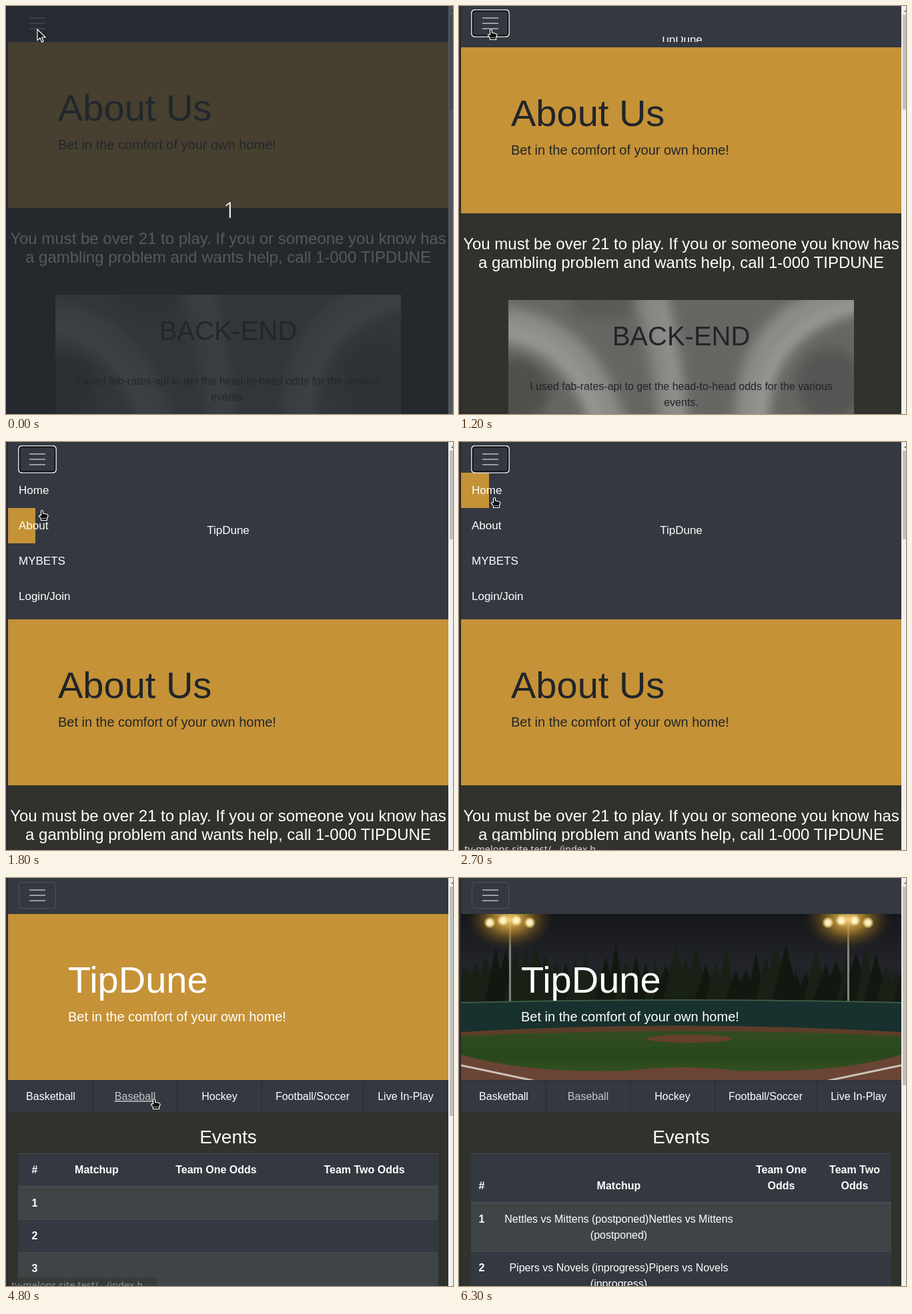
These frames come from a looping animation (670x612 px, 6.8 s). An HTML page:

```html
<!DOCTYPE html>
<html lang="en">
<head>
<meta charset="utf-8">
<title>TipDune</title>
<style>
html, body { margin: 0; width: 100%; height: 100%; overflow: hidden; background: #31312d; }
svg { display: block; width: 100vw; height: 100vh; }
text { font-family: "Liberation Sans", Arial, sans-serif; white-space: pre; }
.ui { font-family: "Noto Sans", "Open Sans", sans-serif; }
</style>
</head>
<body>
<svg id="stage" viewBox="0 0 670 612"></svg>
<script>
const LOOP = 6800, STEP = 100;
const NAV = '#343840', BODY = '#31312d', GOLD = '#c59237', INK = '#212529', LINE = '#454d55';
const BRAND = 'TipDune', SLOGAN = 'Bet in the comfort of your own home!';
const MENU_H = 212;

const rect = (x, y, w, h, fill, more = '') =>
  `<rect x="${x}" y="${y}" width="${w}" height="${h}" fill="${fill}" ${more}/>`;
const text = (x, y, size, fill, str, more = '') =>
  `<text x="${x}" y="${y}" font-size="${size}" fill="${fill}" ${more}>${str}</text>`;
const mid = (x, y, size, fill, str, more = '') =>
  text(x, y, size, fill, str, `text-anchor="middle" ${more}`);
const bold = (x, y, str) => mid(x, y, 16, '#fff', str, 'font-weight="700"');
const group = (id, inner, more = '') => `<g id="${id}" ${more}>${inner}</g>`;

// Soft grey swirls behind the card
function card() {
  const streak = (d, w, c) => `<path d="${d}" fill="none" stroke="${c}" stroke-width="${w}"/>`;
  const swirl =
    streak('M60 470Q190 480 228 640', 54, '#8b8b87') +
    streak('M60 480Q185 495 210 640', 14, '#9a9a96') +
    streak('M285 420Q310 500 325 640', 46, '#868682') +
    streak('M305 420Q322 520 330 640', 12, '#959591') +
    streak('M620 425Q425 445 440 640', 50, '#8b8b87') +
    streak('M620 440Q445 470 455 640', 16, '#9c9c98') +
    `<ellipse cx="85" cy="570" rx="50" ry="50" fill="#4f4f4c"/>
     <ellipse cx="555" cy="560" rx="48" ry="55" fill="#555552"/>
     <ellipse cx="215" cy="440" rx="50" ry="22" fill="#5a5a57"/>`;
  return `<g clip-path="url(#cardClip)">${rect(74, 433, 518, 200, '#666663')}
    <g filter="url(#soft)">${swirl}</g></g>` +
    mid(333, 501, 40, INK, 'BACK-END') +
    mid(333, 568, 16, INK, 'I used fab-rates-api to get the head-to-head odds for the various') +
    mid(333, 592, 16, INK, 'events.');
}

function aboutPage() {
  const links = ['Home', 'About', 'MYBETS', 'Login/Join']
    .map((s, i) => text(19, 78 + 53 * i, 17, '#fff', s)).join('');
  const body = rect(3, 54, 660, 249, GOLD) +
    text(78, 172, 56, INK, 'About Us') + text(78, 215, 20, INK, SLOGAN) +
    mid(333, 357, 24, '#fff', 'You must be over 21 to play. If you or someone you know has') +
    mid(333, 385, 24, '#fff', 'a gambling problem and wants help, call 1-000 TIPDUNE') +
    rect(80, 415, 508, 1, '#000', 'opacity=".12"') + card();
  return rect(3, 0, 660, 300, NAV) + group('aboutBody', rect(3, 54, 660, 700, BODY) + body) +
    `<g clip-path="url(#menuClip)">${rect(0, 46, 0, 53, GOLD, 'id="hover"')}${links}
     ${mid(333, 0, 17, '#fff', BRAND, 'id="brand"')}</g>`;
}

// Floodlit ball field in plain shapes
function field() {
  let seed = 7, trees = '';
  const rnd = () => (seed = seed * 16807 % 2147483647) / 2147483647;
  for (let x = -5; x < 680; x += 15) {
    const h = 48 + rnd() * 48, w = 15 + rnd() * 9;
    trees += `<path d="M${x - w} 192L${x} ${190 - h}L${x + w} 192Z" fill="${rnd() < .5 ? '#12180f' : '#192015'}"/>`;
  }
  const lamp = x => rect(x - 1, 62, 3, 124, '#85857d') +
    `<ellipse cx="${x}" cy="62" rx="66" ry="46" fill="url(#glow)"/>` +
    [-30, -10, 10, 30].map(d => `<circle cx="${x + d}" cy="${62 + Math.abs(d) / 6}" r="9" fill="url(#bulb)"/>`).join('');
  const chalk = d => `<path d="${d}" stroke="#c9c2b8" stroke-width="3"/>`;
  return `<g clip-path="url(#heroClip)">${rect(3, 54, 660, 249, 'url(#sky)')}${trees}${lamp(76)}${lamp(583)}
    <path d="M3 187Q333 179 663 187V230H3Z" fill="#18302e"/>
    <path d="M3 187Q333 179 663 187" fill="none" stroke="#3b5a45" stroke-width="2"/>
    <path d="M3 231Q333 212 663 231V303H3Z" fill="#5c3d29"/>
    <path d="M3 237Q333 222 663 237V303H3Z" fill="url(#grass)"/>
    <ellipse cx="345" cy="241" rx="64" ry="6" fill="#674129"/>
    <path d="M3 265Q70 284 150 288Q240 292 270 287Q335 281 400 287Q430 292 515 288Q600 284 663 265V303H3Z" fill="#6a4434"/>
    ${chalk('M3 281L112 304')}${chalk('M663 281L553 304')}</g>`;
}

function table(id, heads, headH, rowH, rows) {
  let y = 413 + headH, out = rect(18, 413, 630, headH, NAV) + rect(18, 413, 630, 1, LINE) + heads;
  rows.forEach((row, i) => {
    out += rect(18, y, 630, rowH, i % 2 ? NAV : '#3f4447') + rect(18, y - (i ? 0 : 1), 630, i ? 1 : 2, LINE) + row(y + 30);
    y += rowH;
  });
  return group(id, out);
}

function homePage() {
  const tabs = [['Basketball', 67], ['Baseball', 193.5], ['Hockey', 320], ['Football/Soccer', 459.5], ['Live In-Play', 599]]
    .map(([s, x]) => mid(x, 333, 16, '#fff', s, `id="tab${s.slice(0, 4)}"`)).join('');
  const empty = table('empty',
    bold(43, 443, '#') + bold(136, 443, 'Matchup') + bold(315, 443, 'Team One Odds') + bold(537, 443, 'Team Two Odds'),
    50, 49, [1, 2, 3, 4].map(n => y => bold(43, y, n)));
  const game = (n, a, b, state) => y => bold(34, y, n) +
    mid(239.5, y, 16, '#fff', `${a} vs ${b} (${state})${a} vs ${b}`) + mid(239.5, y + 24, 16, '#fff', `(${state})`);
  const games = table('games',
    bold(34, 467, '#') + bold(239.5, 467, 'Matchup') + bold(483, 443, 'Team One') + bold(483, 467, 'Odds') +
    bold(593, 443, 'Team Two') + bold(593, 467, 'Odds'),
    74, 73, [game(1, 'Nettles', 'Mittens', 'postponed'), game(2, 'Pipers', 'Novels', 'inprogress')]);
  return rect(3, 0, 660, 612, BODY) + rect(3, 0, 660, 54, NAV) + rect(3, 54, 660, 249, GOLD) +
    group('field', field()) +
    text(93, 172, 56, '#fff', BRAND) + text(93, 215, 20, '#fff', SLOGAN) +
    rect(3, 303, 660, 49, NAV) + rect(3, 303, 660, 1, '#2b2e33') +
    [130, 256, 383, 535].map(x => rect(x, 303, 1, 49, '#2a2d31')).join('') + tabs +
    mid(333, 398, 28, '#fff', 'Events') + empty + games;
}

const box = (i, c, w) => rect(19.5 + i, 6.5 + i, 55 - 2 * i, 39 - 2 * i, 'none', `rx="4" stroke="${c}" stroke-width="${w}"`);
const toggler = box(0, 'rgba(255,255,255,.13)', 1) +
  group('ring', box(-.5, '#fff', 1.5) + box(1, '#0b0c0e', 1.8)) +
  [18, 26, 34].map(y => rect(35, y - 1, 24, 2, '#fff', 'opacity=".5"')).join('');

const stop = (at, c, o = 1) => `<stop offset="${at}" stop-color="${c}" stop-opacity="${o}"/>`;
const clip = (id, x, y, w, h) => `<clipPath id="${id}">${rect(x, y, w, h, '#000', `id="${id}Box"`)}</clipPath>`;
const defs = `<defs>
  ${clip('menuClip', 3, 46, 660, 0)}${clip('cardClip', 74, 433, 518, 200)}${clip('heroClip', 3, 54, 660, 249)}
  <filter id="soft" filterUnits="userSpaceOnUse" x="40" y="400" width="600" height="260"><feGaussianBlur stdDeviation="9"/></filter>
  <linearGradient id="sky" x2="0" y2="1">${stop(0, '#15171a')}${stop(.3, '#22242a')}${stop(.6, '#171b16')}</linearGradient>
  <linearGradient id="grass" x2="0" y2="1">${stop(0, '#324c22')}${stop(.5, '#29471b')}${stop(1, '#375424')}</linearGradient>
  <radialGradient id="glow">${stop(0, '#f4d27a')}${stop(.4, '#b98a2e', .75)}${stop(1, '#4a3510', 0)}</radialGradient>
  <radialGradient id="bulb">${stop(0, '#fffbe6')}${stop(.5, '#fff0b0', .9)}${stop(1, '#f4cf6a', 0)}</radialGradient>
</defs>`;

const arrow = `<path id="arrow" d="M0 0V16.500L4 13L6.700 19L9.300 18L6.700 12H12Z" fill="#111" stroke="#fff" stroke-width="1.2"/>`;
const hand = group('hand', `<path d="M-1.500 1.500Q0 -1 1.500 1.500V5L7.500 6.500Q9.200 7 9 9.500L7.500 12V15.500H-1.500V13L-4.500 9Q-4.500 7 -1.500 8Z"
  fill="#0c0c0c" stroke="#fff" stroke-width="1.2"/><path d="M0 12.500H6" stroke="#ddd" stroke-width=".8"/>`);

const stage = document.getElementById('stage');
stage.innerHTML = defs + rect(0, 0, 670, 612, BODY) +
  group('about', aboutPage()) + group('home', homePage()) + toggler +
  rect(0, 0, 3, 612, '#33353a') + rect(2, 0, 1, 612, '#1f2023') +
  rect(663, 0, 7, 612, '#f1f1f1') + rect(665, 13, 5, 100, '#c1c1c1', 'id="thumb"') +
  '<path d="M667 9L670 5V9Z" fill="#777"/>' +
  group('status', rect(3, 599, 223, 13, '#33342f') + text(8, 616, 14.500, '#d4d4d4', '', 'id="url" class="ui"')) +
  group('dim', rect(0, 0, 670, 612, '#23272e', 'opacity=".77"') +
    mid(335, 318, 32, '#fff', '1', 'class="ui" stroke="#222" stroke-width=".6"')) +
  group('cursor', arrow + hand);

const el = id => document.getElementById(id);
const set = (id, attrs) => { for (const k in attrs) el(id).setAttribute(k, attrs[k]); };
const show = (id, on) => set(id, { opacity: +on });

// CSS "ease" curve
function ease(x) {
  if (x <= 0) return 0;
  if (x >= 1) return 1;
  let lo = 0, hi = 1, s;
  for (let i = 0; i < 24; i++) {
    s = (lo + hi) / 2;
    if (.75 * s * (1 - s) + s ** 3 < x) lo = s; else hi = s;
  }
  return .3 * s * (1 - s) ** 2 + 3 * s * s * (1 - s) + s ** 3;
}

// Each stop is [time, ...values]; values glide between stops
function along(stops, t) {
  let i = stops.length - 1;
  while (i && stops[i][0] > t) i--;
  const a = stops[i], b = stops[i + 1] || a;
  const k = b === a ? 0 : (t - a[0]) / (b[0] - a[0]);
  return a.slice(1).map((v, j) => v + (b[j + 1] - v) * k);
}

const PATH = [[0, 47, 35], [1100, 47, 35], [1200, 48, 35], [1600, 48, 35], [1800, 54, 102], [2000, 54, 102],
  [2200, 53, 114], [2300, 53, 114], [2400, 54, 99], [2500, 54, 99], [2600, 54, 88], [2700, 53, 83], [3700, 53, 83],
  [4000, 296, 199], [4100, 296, 199], [4400, 243, 292], [4600, 222, 331], [5600, 222, 331], [5900, 262, 190], [6200, 318, 46]];
const STATUS = [[0, 0], [2000, 0], [2100, .6], [2200, 1], [3500, 1], [3600, .7], [3700, .12], [3800, 0],
  [4700, 0], [4800, .5], [4900, 1], [5600, 1], [5700, .7], [5800, .2], [5900, 0]];
const RING = [[0, 0], [1100, 0], [1200, 1], [3000, 1], [3100, .5], [3200, 0]];

function draw(ms) {
  const t = Math.floor(ms / STEP) * STEP;
  const home = t >= 3600, photo = t >= 5100, filled = t >= 5200;
  const p = ease((t - 1179) / 376), h = Math.round(MENU_H * p);
  const [x, y] = along(PATH, t);

  show('dim', t < 500);
  show('about', !home);
  show('home', home);
  show('field', photo);
  show('games', filled);
  show('empty', !filled);

  set('aboutBody', { transform: `translate(0 ${h})` });
  set('menuClipBox', { height: h });
  set('brand', { y: p < 1 ? 52 + h / 2 : 138 });
  const onHome = t === 1700 || t >= 2600, onAbout = t >= 1800 && t < 2600;
  set('hover', { y: onAbout ? 99 : 46, width: onHome ? 45 : onAbout ? 44 : 0 });

  const over = t >= 4500 && t < 5700;
  set('tabBase', { fill: over || photo ? '#c3c5c8' : '#fff', 'text-decoration': over ? 'underline' : 'none' });

  const end = !home ? 156 - h * .047 : filled ? 311 : 357;
  set('thumb', { height: end - 13 });
  set('ring', { opacity: along(RING, t)[0] });
  set('status', { opacity: along(STATUS, t)[0] });
  el('url').textContent = 'ty-melons.site.test/…/' + (t < 2600 ? 'about' : 'index.h');

  const pointing = t >= 1200 && t < 3800 || over;
  set('cursor', { transform: `translate(${Math.round(x)} ${Math.round(y)})` });
  show('cursor', t < 6300);
  show('hand', pointing);
  show('arrow', !pointing);
}

const start = performance.now();
function frame() {
  draw((performance.now() - start) % LOOP);
  requestAnimationFrame(frame);
}
frame();
</script>
</body>
</html>
```
